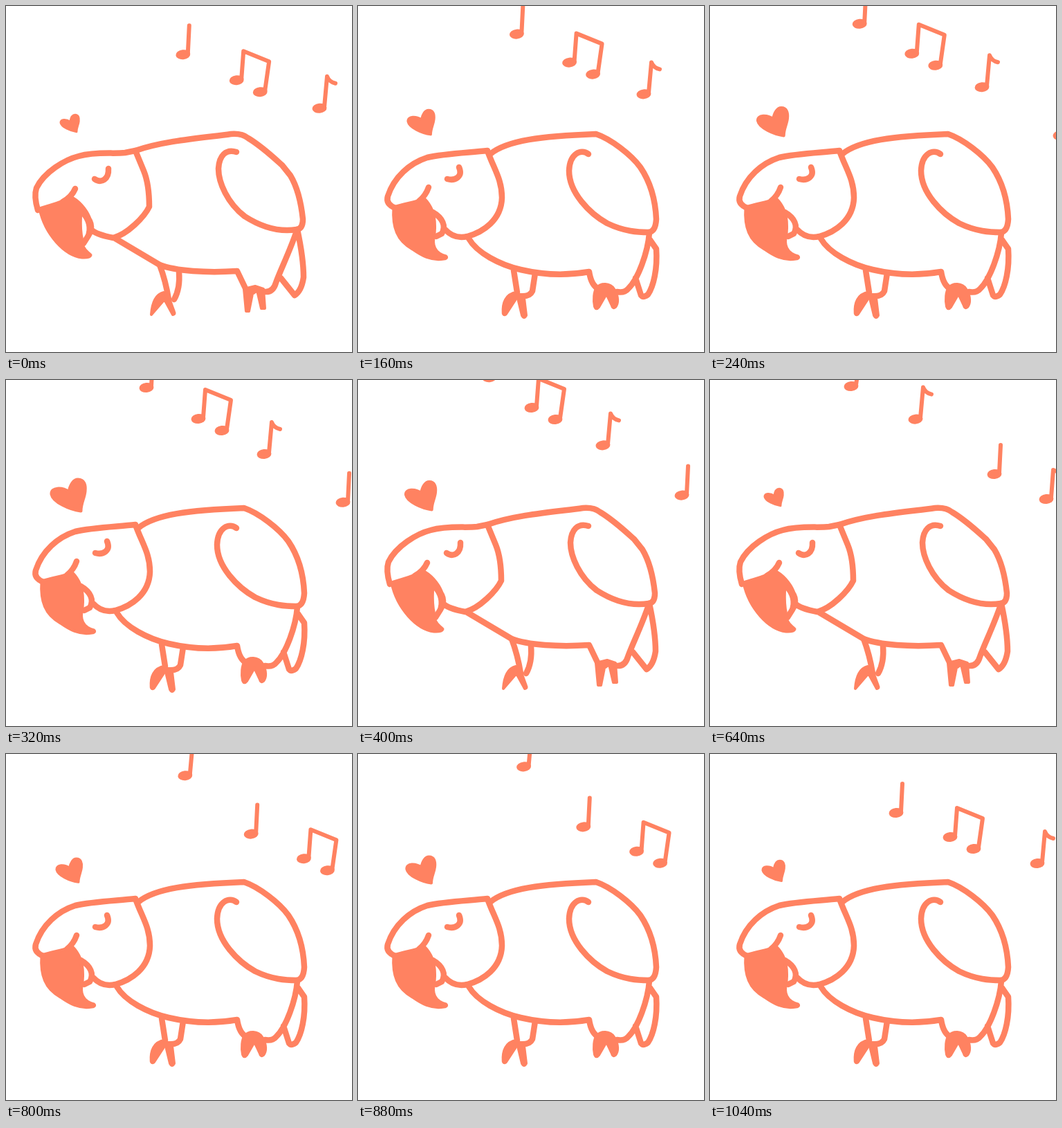
Recreate the animation shown at these times as an HTML page with a canvas. Size 500 px wide and 500 px high, loop 1120 ms.

```html
<!DOCTYPE html>
<html lang="en">
<head>
<meta charset="utf-8">
<title>Singing parrot</title>
<style>
  html, body { margin: 0; width: 100%; height: 100%; overflow: hidden; background: #fff; }
  canvas { display: block; }
</style>
</head>
<body>
<canvas id="stage" width="500" height="500"></canvas>
<script>
const ctx = document.getElementById('stage').getContext('2d');
const CORAL = '#ff8261', STEP = 80, COUNT = 14, LEG = 5;

const low = {
  head: `M46 295C43 285 41 272 44 263C55 240 85 222 105 217C130 210 155 214 172 212L187 209
    L199 238C206 255 207 275 207 290C200 305 175 330 155 335C145 333 130 330 123 323`,
  face: 'M82 283Q95 276 100 264M128 250C138 257 149 250 148 235M113 301C122 308 127 320 119 332L112 343',
  body: `M187 209C230 194 290 190 325 185C338 184 345 187 350 191C370 203 390 222 399 230L411 245
    C420 260 426 280 429 308Q429 322 420 323M158 336L222 374C245 383 290 386 334 383L346 408`,
  wing: 'M333 211C318 206 308 216 307 235C307 255 320 285 345 304C370 320 395 327 420 323',
  tail: 'M420 325C410 355 395 385 390 400Q386 414 374 413M421 323Q430 365 430 392Q427 412 417 418L397 393',
  legs: 'M222 374Q231 398 235 424M250 384Q252 408 243 424',
  beak: `M49 293C60 288 80 286 93 276C105 281 116 295 120 305L121 325L110 345C112 352 117 356 122 360
    C121 363 116 363 110 363C85 360 57 330 49 293Z`,
  feet: `M228 414Q212 418 210 446L229 424L241 446Q245 445 243 442L235 420Z
    M344 409L360 405L372 409L374 437L369 437L363 411L356 416L351 441L347 441Z`,
  gap: 'M110 304Q122 320 112 337Q109 323 110 304Z'
};

const high = {
  head: `M54 292C44 288 41 282 43 275C52 247 75 227 100 219C125 213 160 212 187 209
    C196 235 208 250 208 277C207 310 180 327 158 333C145 336 135 333 126 323`,
  face: 'M88 282Q98 274 102 262M129 250C140 253 152 247 146 233M108 298C122 306 128 318 121 329L113 333',
  body: `M191 214C215 194 265 188 344 185C365 192 395 215 408 233C425 258 430 285 431 308Q430 326 420 327
    M160 336C172 357 205 374 235 381C265 388 300 390 334 384Q337 404 348 409`,
  wing: 'M333 214C322 206 306 213 305 238C305 270 335 300 360 314C385 326 405 327 420 327',
  tail: `M421 328C419 355 405 395 390 409Q385 415 374 413
    M422 338L431 351C433 380 427 405 419 417Q412 422 409 418L401 393`,
  legs: 'M225 382L230 414M256 386L252 412Q248 421 232 419M230 416C215 418 211 430 212 444L229 418',
  beak: `M52 291C70 285 86 284 95 278C104 287 113 300 110 330C105 348 113 358 127 362
    C129 364 126 365 124 365C105 368 92 360 79 351C57 339 50 320 52 291Z`,
  feet: `M231 422L240 422L243 447Q240 453 237 447Z
    M345 407C351 400 364 400 370 409C377 420 376 430 372 435Q368 438 367 433L359 416L348 435Q344 440 342 434C340 425 341 412 345 407Z`,
  gap: 'M113 306Q121 318 118 328L113 330Z'
};

for (const pose of [low, high])
  for (const part in pose) pose[part] = new Path2D(pose[part]);

const heart = new Path2D('M0-2C-16-4-40-15-42-26C-43-36-27-36-17-29C-15-40-10-47-4-47C5-47 7-39 6-30C5-20 0-13 0-2Z');

// Each note passes its waypoints (left head x, y) LEG steps apart.
// Heads and stem lines are measured from the left head.
const notes = [
  {
    start: 3, way: [[506, 187], [411, 136], [269, 85], [203, 11]],
    heads: [[0, 0]], stem: 'M7-2L9-42'
  },
  {
    start: 8, way: [[486, 172], [347, 120], [278, 56], [143, -24]],
    heads: [[0, 0], [34, 17]], stem: 'M7-2L10-42L47-27L41 15'
  },
  {
    start: 13, way: [[473, 158], [373, 107], [278, 44], [182, -20]],
    heads: [[0, 0]], stem: 'M7-2L11-46Q14-38 23-36'
  }
];
for (const note of notes) note.stem = new Path2D(note.stem);

function drawNote({ start, way, heads, stem }, step) {
  const age = (step - start) / LEG;
  const i = Math.max(0, Math.min(way.length - 2, Math.floor(age)));
  const [x, y] = way[i].map((v, axis) => v + (way[i + 1][axis] - v) * (age - i));
  ctx.save();
  ctx.translate(x, y);
  ctx.lineWidth = 6;
  ctx.stroke(stem);
  for (const [hx, hy] of heads) {
    ctx.beginPath();
    ctx.ellipse(hx, hy, 10.5, 7, -.1, 0, 2 * Math.PI);
    ctx.fill();
  }
  ctx.restore();
}

function drawSolid(path, outline) {
  ctx.lineWidth = outline;
  ctx.fill(path);
  ctx.stroke(path);
}

// One strong beat, then a weaker one.
function drawHeart(step) {
  const beat = step < 8 ? 1 - Math.abs(step - 4) / 4 : .65 * (1 - Math.abs(step - 11) / 3);
  const size = .55 + .45 * beat;
  ctx.save();
  ctx.translate(102 + 6 * beat, 183 + 8 * beat);
  ctx.scale(size, size);
  drawSolid(heart, 5);
  ctx.restore();
}

function drawBird(pose) {
  drawSolid(pose.beak, 5);
  drawSolid(pose.feet, 4);
  ctx.fillStyle = '#fff';
  ctx.fill(pose.gap);
  ctx.fillStyle = CORAL;
  ctx.lineWidth = 8.5;
  for (const part of ['head', 'face', 'body', 'wing', 'tail', 'legs']) ctx.stroke(pose[part]);
}

function draw(now) {
  const step = Math.floor(now / STEP) % COUNT;
  ctx.fillStyle = '#fff';
  ctx.fillRect(0, 0, 500, 500);
  ctx.fillStyle = ctx.strokeStyle = CORAL;
  ctx.lineCap = ctx.lineJoin = 'round';
  drawBird(step < 2 || (step > 4 && step < 10) ? low : high);
  drawHeart(step);
  for (const note of notes) {
    drawNote(note, step);
    drawNote(note, step + COUNT);
  }
}

const begin = performance.now();
function tick() {
  draw(performance.now() - begin);
  requestAnimationFrame(tick);
}
tick();
</script>
</body>
</html>
```
